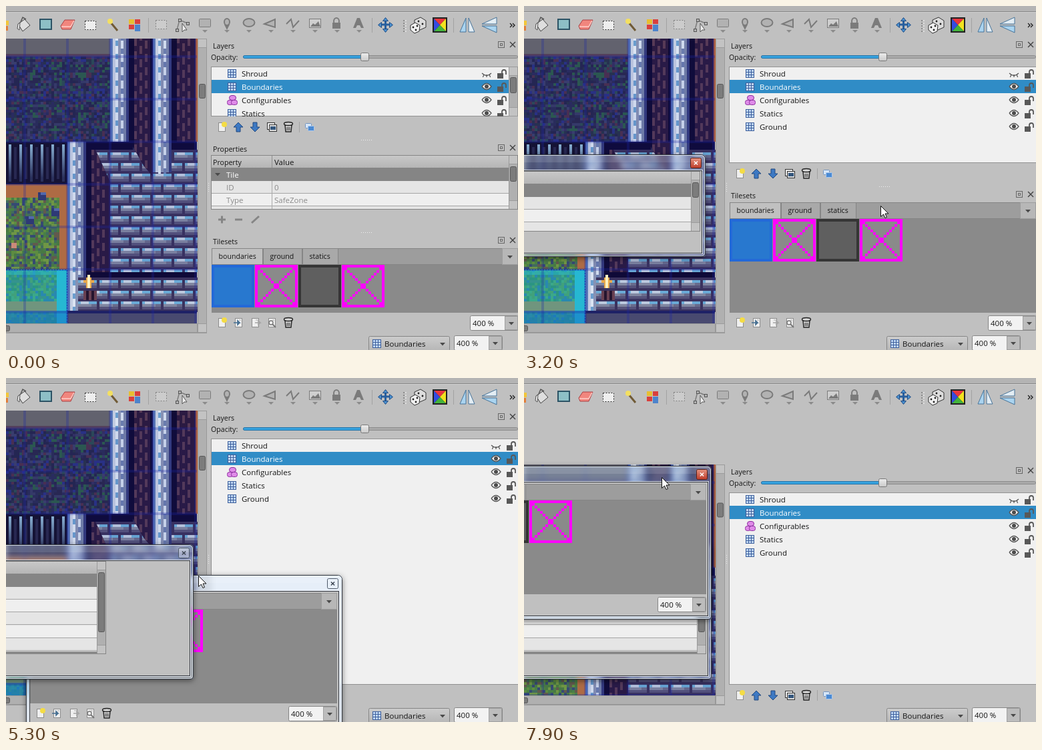
Recreate the animation shown at these times as an HTML page with a canvas. Size 767x517 px, loop 8 s.

```html
<!DOCTYPE html>
<html lang="en">
<head>
<meta charset="utf-8">
<title>Rearranging docks in a map editor</title>
<style>
html, body { margin: 0; width: 100%; height: 100%; overflow: hidden; background: #c0c0c0; }
canvas { display: block; width: 767px; height: 517px; }
</style>
</head>
<body>
<canvas id="stage" width="767" height="517"></canvas>
<script>
const W = 767, H = 517, LOOP = 8000, STEP = 100;
const cv = document.getElementById('stage');
const ctx = cv.getContext('2d');
const layer = () => Object.assign(document.createElement('canvas'), { width: W, height: H });
const back = layer(), map = layer();
const FONT = '"Open Sans", "Noto Sans", sans-serif', SMALL = 10.6;
let g = ctx;

// Drawing helpers
function box(x, y, w, h, fill, line) {
  if (fill) { g.fillStyle = fill; g.fillRect(x, y, w, h); }
  if (line) { g.strokeStyle = line; g.lineWidth = 1; g.strokeRect(x + .5, y + .5, w - 1, h - 1); }
}
function trace(points, closed) {
  g.beginPath();
  for (let i = 0; i < points.length; i += 2) g.lineTo(points[i], points[i + 1]);
  if (closed) g.closePath();
}
function shape(points, fill, line, width = 1, closed = true) {
  trace(points, closed);
  if (fill) { g.fillStyle = fill; g.fill(); }
  if (line) { g.strokeStyle = line; g.lineWidth = width; g.stroke(); }
}
const path = (points, color, width) => shape(points, null, color, width, false);
function oval(x, y, rx, ry, fill, line, width = 1) {
  g.beginPath();
  g.ellipse(x, y, rx, ry, 0, 0, 7);
  if (fill) { g.fillStyle = fill; g.fill(); }
  if (line) { g.strokeStyle = line; g.lineWidth = width; g.stroke(); }
}
function round(x, y, w, h, r, fill, line) {
  g.beginPath();
  g.roundRect(x + .5, y + .5, w - 1, h - 1, r);
  if (fill) { g.fillStyle = fill; g.fill(); }
  if (line) { g.strokeStyle = line; g.lineWidth = 1; g.stroke(); }
}
function text(s, x, y, color = '#151515', size = 11.5) {
  g.font = `${size}px ${FONT}`;
  g.fillStyle = color;
  g.fillText(s, x, y);
}
function shade(y, h, a, b) {
  const grad = g.createLinearGradient(0, y, 0, y + h);
  grad.addColorStop(0, a);
  grad.addColorStop(1, b);
  return grad;
}
function at(x, y, draw) {
  g.save();
  g.translate(x, y);
  draw();
  g.restore();
}
function within(points, draw) {
  g.save();
  trace(points, true);
  g.clip();
  draw();
  g.restore();
}
const clipped = (x, y, w, h, draw) => within([x, y, x + w, y, x + w, y + h, x, y + h], draw);
function track(keys, t) {
  if (t <= keys[0][0]) return keys[0].slice(1);
  for (let i = 1; i < keys.length; i++) {
    const a = keys[i - 1], b = keys[i];
    if (t <= b[0]) {
      const k = (t - a[0]) / (b[0] - a[0]);
      return a.slice(1).map((v, j) => v + (b[j + 1] - v) * k);
    }
  }
  return keys[keys.length - 1].slice(1);
}

// Pixel-art map, drawn once
let seed = 7;
const rand = () => (seed = (seed * 16807) % 2147483647) / 2147483647;
function noise(x0, y0, x1, y1, colors) {
  for (let y = y0; y < y1; y += 4)
    for (let x = x0; x < x1; x += 4) box(x, y, 4, 4, colors[rand() * colors.length | 0]);
}
function pillar(x, y0, y1) {
  box(x, y0, 28, y1 - y0, '#8792b4');
  box(x, y0, 4, y1 - y0, '#5a78b8');
  box(x + 4, y0, 4, y1 - y0, '#c3cde2');
  for (let y = y0; y < y1; y += 4) {
    const n = y / 4 | 0;
    box(x + 8, y, 4, 4, n % 5 < 3 ? '#dbe4f2' : '#6a9dce');
    box(x + 16, y, 4, 4, (n + 2) % 5 < 3 ? '#d0dbee' : '#6a7cae');
  }
  box(x + 20, y0, 4, y1 - y0, '#7480a8');
  box(x + 24, y0, 4, y1 - y0, '#343a7c');
}
function shadowWall(x0, y0, x1, y1) {
  box(x0, y0, x1 - x0, y1 - y0, '#2b1a42');
  for (let x = x0 + 8; x < x1 - 4; x += 8)
    for (let y = y0; y < y1; y += 4)
      if ((y / 4 + x / 8 * 2 | 0) % 5 < 3) box(x, y, 4, 4, '#573a56');
  box(x0, y0, 8, y1 - y0, '#100b36');
}
function bricks(x0, y0, x1, y1) {
  clipped(x0, y0, x1 - x0, y1 - y0, () => {
    box(x0, y0, x1 - x0, y1 - y0, '#3a325e');
    for (let y = y0, n = 0; y < y1; y += 16, n++)
      for (let x = x0 - 32 + n % 2 * 16; x < x1; x += 32) {
        box(x, y + 4, 28, 4, '#6aaad6');
        box(x + 4, y + 4, 12, 4, '#bcc9de');
        box(x, y + 8, 28, 4, '#8086a0');
        box(x + 20, y + 8, 8, 4, '#686b8c');
        box(x, y + 12, 28, 4, '#56537a');
      }
  });
}
function paintMap() {
  g = map.getContext('2d');
  box(0, 48, 286, 430, '#292b58');
  box(0, 48, 156, 24, '#62626e');
  box(0, 72, 156, 4, '#54405c');
  const dark = ['#25264f', '#2b2c5c', '#343062', '#4b304f', '#28324c', '#2b3284', '#2d4a55', '#3b3f6b', '#25264f'];
  noise(0, 76, 156, 204, dark);
  for (const y of [84, 148])
    for (let x = 32; x < 156; x += 36) noise(x, y, x + 16, y + 40, ['#2b2d58', '#2d5a4c', '#373a66', '#29274f']);
  pillar(156, 48, 204);
  shadowWall(184, 48, 220, 204);
  box(216, 48, 4, 156, '#100b36');
  shadowWall(248, 48, 284, 204);
  box(284, 48, 4, 156, '#c4692f');
  bricks(124, 216, 288, 400);
  within([120, 216, 134, 216, 156, 264, 156, 404, 120, 404], () => shadowWall(120, 204, 156, 404));
  within([186, 204, 220, 204, 220, 256, 206, 240], () => shadowWall(184, 204, 220, 256));
  box(120, 204, 70, 12, '#0f0a38');
  pillar(220, 48, 250);
  box(248, 204, 38, 12, '#0f0a38');

  box(0, 204, 92, 64, '#15122f');
  for (let x = 4; x < 92; x += 16) {
    box(x, 208, 4, 56, shade(208, 50, '#8fb8d6', '#2c3158'));
    box(x + 8, 212, 4, 48, '#29284e');
  }
  box(0, 268, 92, 130, '#b8703f');
  noise(0, 288, 80, 396, ['#4b7d3f', '#62933c', '#759d40', '#45705a', '#384c70', '#4c8542', '#665d48']);
  for (const [x, y] of [[48, 280], [68, 304], [30, 316]]) {
    box(x, y, 12, 12, '#303a74');
    box(x + 4, y, 8, 4, '#566cad');
  }
  box(8, 356, 8, 8, '#d59078');
  pillar(92, 204, 460);
  box(120, 400, 166, 8, '#0f0a38');
  bricks(108, 408, 288, 460);
  box(92, 458, 194, 20, '#494a70');
  box(92, 458, 194, 4, '#20204e');

  noise(0, 396, 76, 478, ['#3e895b', '#5c9b50', '#4a866b', '#3a789a', '#55a565']);
  box(0, 444, 76, 16, '#a08a55');
  box(0, 396, 92, 82, 'rgba(0,175,220,.3)');
  box(0, 396, 92, 8, 'rgba(38,184,210,.5)');
  box(76, 396, 16, 82, '#26b8d2');
  box(0, 458, 92, 20, 'rgba(20,110,200,.5)');
  g.setLineDash([2, 2]);
  path([0, 396.5, 91.5, 396.5, 91.5, 477], '#173bb8', 1);
  g.setLineDash([]);

  box(116, 428, 20, 14, '#25152f');
  for (let x = 116; x < 138; x += 8) box(x, 428, 4, 14, '#694152');
  box(120, 408, 8, 16, '#e9a94c');
  box(116, 412, 16, 4, '#e9a94c');
  box(122, 404, 4, 20, '#fff2c0');

  // Boundary tint and tile grid
  box(0, 76, 286, 320, 'rgba(30,40,150,.06)');
  for (let x = 28; x < 286; x += 64) box(x - 2, 48, 4, 430, 'rgba(28,38,165,.28)');
  for (let y = 76; y < 478; y += 64) box(0, y - 2, 286, 4, 'rgba(28,38,165,.28)');
  g = ctx;
}

// Widgets
function scrollbar(x, y, h, from, size) {
  box(x, y, 14, h, '#b0b0b0', '#989898');
  box(x, y, 14, 14, '#c3c3c3', '#9b9b9b');
  box(x, y + h - 14, 14, 14, '#c3c3c3', '#9b9b9b');
  round(x + 2, from, 10, size, 2, '#7c7c7c', '#575757');
}
function arrow(x, y) { shape([x - 4, y - 2, x + 4, y - 2, x, y + 2.5], '#4a4a4a'); }
function dots(x, y) { for (let i = 0; i < 6; i++) box(x + i * 3, y, 1, 1, '#eee'); }
function combo(x, y, label, w, white) {
  round(x, y, w, 23, 2, white ? '#f2f2f2' : shade(y, 23, '#cdcdcd', '#b5b5b5'), '#858585');
  if (white) box(x + 52, y + 1, w - 53, 21, '#bcbcbc', '#a0a0a0');
  arrow(x + w - 11, y + 12);
  text(label, x + (white ? 4 : 24), y + 16);
}
function cross(x, y, r, color) {
  path([x - r, y - r, x + r, y + r], color, 1.4);
  path([x + r, y - r, x - r, y + r], color, 1.4);
}
function dockTitle(name, y) {
  text(name, 310, y + 6, '#151515', SMALL);
  box(737, y - 5, 10, 10, null, '#666');
  box(740, y - 2, 4, 4, null, '#666');
  cross(759, y, 4, '#444');
}
function gridIcon(x, y) {
  box(x, y, 13, 13, '#3d5f9c');
  for (let i = 0; i < 9; i++) box(x + 1 + i % 3 * 4, y + 1 + (i / 3 | 0) * 4, 3, 3, '#c2d9f5');
}
function page(x, y) {
  box(x - 5, y - 7, 11, 14, '#efefef', '#8d8d8d');
  path([x + 1, y - 4, x + 4, y - 4], '#aaa', 1);
}
function newIcon(x, y) {
  page(x, y);
  oval(x + 4, y - 4, 4, 4, '#f4dc45');
}
function trash(x, y) {
  shape([x - 5, y - 3, x + 5, y - 3, x + 4, y + 7, x - 4, y + 7], '#cacaca', '#222', 1.4);
  oval(x, y - 5, 6.5, 2.5, '#d5d5d5', '#222', 1.4);
  for (let i = -2; i < 3; i += 2) path([x + i, y, x + i, y + 5], '#444', 1);
}
function bigArrow(x, y, s) {
  shape([x, y - 7 * s, x + 7, y, x + 3, y, x + 3, y + 7 * s, x - 3, y + 7 * s, x - 3, y, x - 7, y], '#3d79c3', '#22497f');
}
function tileButtons(x, y) {
  newIcon(x + 15, y);
  for (let i = 1; i < 4; i++) page(x + 15 + i * 25, y);
  path([x + 33, y, x + 42, y, x + 39, y - 3, x + 39, y + 3, x + 42, y], '#456f91', 1.6);
  path([x + 65, y, x + 73, y, x + 70, y - 3, x + 70, y + 3, x + 73, y], '#a5a5a5', 1.6);
  oval(x + 89, y, 3, 3, null, '#777', 1.4);
  path([x + 91, y + 2, x + 96, y + 7], '#777', 2);
  trash(x + 115, y);
}
function eye(x, y, open) {
  g.beginPath();
  g.moveTo(x - 7, y);
  if (open) g.quadraticCurveTo(x, y - 9, x + 7, y);
  g.quadraticCurveTo(x, y + (open ? 9 : 7), open ? x - 7 : x + 7, y);
  g.lineWidth = 1.3;
  g.strokeStyle = '#555';
  if (open) { g.fillStyle = '#f4f4f4'; g.fill(); }
  g.stroke();
  if (open) oval(x, y, 3, 3, '#4c4c4c');
  else for (let i = -4; i < 5; i += 4) path([x + i, y + 2, x + i * 1.4, y + 6], '#555', 1.2);
}
function lock(x, y) {
  box(x - 7, y - 1, 9, 8, '#585858');
  g.beginPath();
  g.arc(x + 3, y - 3, 3, Math.PI, 0);
  g.strokeStyle = '#585858';
  g.lineWidth = 1.8;
  g.stroke();
  path([x, y - 3, x, y], '#585858', 1.8);
  path([x + 6, y - 3, x + 6, y + 1], '#585858', 1.8);
}

function toolbar() {
  box(0, 0, W, 8, '#b4b4b4');
  box(0, 8, W, 1, '#858585');
  box(0, 9, W, 1, '#d3d3d3');
  const gray = '#7b7b7b', mid = '#b2b2b2';
  box(-4, 22, 8, 7, '#f2c63b');
  box(-4, 30, 7, 7, '#e2803c');
  shape([18, 27, 28, 20, 36, 29, 25, 38], '#dedede', '#444');
  shape([18, 27, 21, 25, 20, 36, 17, 34], '#e6e6e6', '#555');
  path([22, 24, 25, 17, 30, 20], '#555', 1.5);
  box(50, 19, 19, 17, '#2c5365');
  box(52, 21, 15, 13, '#8dbfc6');
  shape([82, 30, 88, 21, 103, 21, 97, 35, 84, 35], '#f1867e', '#a93f42');
  path([83, 31, 97, 31, 102, 22], '#ffd0ca', 1.4);
  g.setLineDash([2, 2]);
  box(118, 22, 17, 14, '#eee', '#222');
  box(224, 21, 17, 14, '#ccc', gray);
  g.setLineDash([]);
  path([157, 25, 167, 37], '#705a36', 3);
  oval(156, 23, 4, 4, '#f3df61');
  box(184, 20, 8, 7, '#e8bf31');
  box(193, 20, 8, 7, '#d9403d');
  box(184, 28, 8, 7, '#d9403d');
  box(193, 28, 8, 10, '#4d83cb');
  for (const x of [213, 548, 670]) box(x, 18, 1, 22, '#a2a2a2');
  path([256, 36, 260, 21, 272, 26], gray, 1.5);
  shape([264, 26, 264, 39, 267, 36, 271, 36], '#eee', '#555');
  for (const [x, y] of [[254, 34], [258, 19], [270, 24]]) box(x, y, 5, 5, mid, '#555');
  round(289, 19, 18, 13, 1, mid, gray);
  oval(331, 24, 4, 5, mid, gray, 2);
  shape([327, 28, 335, 28, 331, 36], gray);
  oval(364, 25, 8.5, 6, mid, gray, 2);
  shape([387, 27, 403, 20, 403, 32], mid, gray, 2);
  path([420, 27, 427, 20, 430, 32, 439, 22], gray, 2);
  box(454, 19, 18, 14, '#cfcfcf', gray);
  shape([456, 31, 460, 26, 463, 28, 468, 23, 471, 31], gray);
  box(489, 25, 12, 9, gray);
  oval(495, 23, 4, 5, null, gray, 2);
  shape([520, 33, 526, 18, 530, 18, 536, 33, 532, 33, 530, 29, 526, 29, 524, 33], gray);
  for (let x = 298; x < 535; x += 33) shape([x - 4, 36, x + 4, 36, x, 40], '#8a8a8a');
  path([559, 28, 578, 28], '#285f9e', 3);
  path([568.5, 19, 568.5, 38], '#285f9e', 3);
  for (let i = 0; i < 4; i++) at(568.5, 28.5, () => {
    g.rotate(i * Math.PI / 2);
    shape([0, -11, 4, -6, -4, -6], '#4c92d1', '#1f4b83');
  });
  for (let y = 21; y < 38; y += 4) { box(595, y, 2, 2, '#8d8d8d'); box(598, y, 2, 2, '#ddd'); }
  shape([612, 21, 621, 17, 629, 22, 629, 32, 620, 36, 612, 30], '#ddd', '#333');
  shape([606, 29, 613, 25, 620, 29, 619, 38, 612, 41, 606, 36], '#f1f1f1', '#333');
  for (const [x, y] of [[618, 23], [624, 27], [610, 32], [614, 36], [616, 30]]) oval(x, y, 1.4, 1.4, '#222');
  box(639, 17, 22, 23, '#222');
  const fan = [[641, 19, 659, 19, '#e8363d'], [659, 19, 659, 38, '#f2e21f'], [659, 38, 641, 38, '#43b33c'], [641, 38, 641, 19, '#334be0']];
  for (const [a, b, c, d, color] of fan) shape([a, b, c, d, 650, 28.5], color);
  shape([680, 39, 689, 18, 689, 39], '#aad4f0', '#477398');
  shape([702, 39, 693, 18, 693, 39], '#e3edf4', '#477398');
  shape([713, 27, 735, 17, 735, 27], '#e3edf4', '#477398');
  shape([713, 30, 735, 40, 735, 30], '#aad4f0', '#477398');
  for (const x of [755, 759]) path([x, 26, x + 3, 29, x, 32], '#222', 1.4);
}

function mapView(gap) {
  clipped(0, 49 + gap, 287, 428 - gap, () => g.drawImage(map, 0, gap));
  scrollbar(287, 49 + gap, 442 - gap, 117 + gap * .87, 22);
  box(0, 477, 287, 14, '#b0b0b0', '#989898');
  round(-8, 480, 14, 9, 2, '#7c7c7c', '#575757');
  for (let y = 266; y < 280; y += 3) box(303, y, 1, 1, '#eee');
  box(0, 491, 301, 1, '#999');
}

function layersDock(gap, bottom, narrow) {
  const names = ['Shroud', 'Boundaries', 'Configurables', 'Statics', 'Ground'];
  at(0, gap, () => {
    dockTitle('Layers', 58);
    text('Opacity:', 307, 81, '#151515', SMALL);
    round(355, 74, 412, 5, 2, '#aaa', '#8b8b8b');
    round(355, 74, 180, 5, 2, '#38a3df', '#2172a8');
    round(531, 70, 13, 13, 2, shade(70, 13, '#eee', '#c8c8c8'), '#777');
  });
  const top = 91 + gap;
  clipped(307, top, 460, bottom - top, () => {
    box(307, top, 461, bottom - top, '#f0f0f0', '#919191');
    names.forEach((name, i) => {
      const y = 101 + gap + i * 20, on = i === 1;
      if (on) box(308, y - 10, 460, 20, '#308cc6');
      if (i === 2) {
        round(334, y - 7, 11, 8, 4, '#df8be8', '#8b2c9d');
        round(331, y, 9, 8, 3, '#df8be8', '#8b2c9d');
        round(337, y, 10, 8, 3, '#df8be8', '#8b2c9d');
      } else gridIcon(332, y - 6);
      text(name, 353, y + 5, on ? '#fff' : '#151515');
      eye(narrow ? 720 : 734, y, i > 0);
      lock(narrow ? 743 : 757, y + 1);
    });
    if (narrow) scrollbar(753, top, bottom - top, 107, 24);
  });
  const y = bottom + 16;
  newIcon(323, y);
  bigArrow(348, y, 1);
  bigArrow(373, y, -1);
  box(391, y - 7, 12, 11, '#eee', '#333');
  box(394, y - 4, 12, 11, '#ddd', '#333');
  box(396, y - 1, 8, 5, '#33567d');
  trash(423, y);
  box(439, y - 8, 1, 16, '#a3a3a3');
  round(448, y - 6, 10, 8, 1, '#d7e6f7', '#7293bd');
  round(452, y - 2, 10, 8, 1, '#4b8ad3', '#aecbef');
}

function propTable(x, y, right, h) {
  const w = right - x, row = 19.3;
  clipped(x, y, w, h, () => {
    box(x, y, w, h, '#8a8a8a');
    for (let i = 0; i < 5; i++) {
      const ry = Math.round(y + (i + 2) * row);
      box(x, ry, w, 20, i % 2 ? '#efefef' : '#e5e5e5');
      box(x, ry + 18, w, 1, '#a5a5a5');
    }
    box(x, y, w, 19, shade(y, 19, '#c9c9c9', '#b5b5b5'));
    box(x, y + 19, w, 20, '#858585');
    box(x + 91, y, 1, 19, '#8f8f8f');
    box(x + 91, y + 39, 1, 96, '#aaa');
    text('Property', x + 3, y + 15, '#151515', SMALL);
    text('Value', x + 95, y + 15);
    arrow(x + 10, y + 29);
    text('Tile', x + 23, y + 34, '#fff');
    text('ID', x + 23, y + 53, '#8b8b8b');
    text('0', x + 95, y + 53, '#8b8b8b');
    text('Type', x + 23, y + 72, '#8b8b8b');
    text('SafeZone', x + 95, y + 72, '#8b8b8b');
    scrollbar(right - 14, y, h, y + 17, h > 125 ? 90 : 23);
    box(x, y, w, h, null, '#858585');
  });
}
function propButtons(x, y) {
  path([x + 10, y, x + 21, y], '#858585', 3);
  path([x + 15.5, y - 5.5, x + 15.5, y + 5.5], '#858585', 3);
  path([x + 35, y, x + 46, y], '#858585', 3);
  path([x + 60, y + 5, x + 71, y - 5], '#858585', 3);
}

function tileset(x, y, right, h) {
  const w = right - x;
  box(x, y, w, 25, '#9d9d9d', '#858585');
  [['boundaries', 0, 77], ['ground', 77, 59], ['statics', 136, 54]].forEach(([name, left, tw], i) => {
    box(x + left, y, tw, 25, i ? '#a9a9a9' : '#c0c0c0', '#858585');
    text(name, x + left + 10.5, y + 16, '#151515', SMALL);
  });
  box(right - 24, y, 24, 25, '#b7b7b7', '#9d9d9d');
  arrow(right - 12, y + 13);
  const ty = y + 25;
  box(x, ty, w, h, '#8a8a8a');
  for (let i = 0; i < 4; i++) {
    const tx = x + i * 65;
    if (i % 2) {
      box(tx, ty, 64, 64, '#ff00ff');
      box(tx + 4, ty + 4, 56, 56, '#8a8a8a');
      for (let p = 1; p < 15; p++) {
        box(tx + p * 4, ty + p * 4, 4, 4, '#ff00ff');
        box(tx + 60 - p * 4, ty + p * 4, 4, 4, '#ff00ff');
      }
    } else {
      box(tx, ty, 64, 64, i ? '#353535' : '#2369d8');
      box(tx + 4, ty + 4, 56, 56, i ? '#5f5f5f' : '#2878cf');
    }
  }
  tileButtons(x, ty + h + 15);
}

// Floating glass window
function glass(l, t, w, h, tint, active, draw) {
  const r = l + w;
  back.getContext('2d').drawImage(cv, 0, 0);
  g.save();
  g.shadowColor = 'rgba(0,0,0,.55)';
  g.shadowBlur = 9;
  g.shadowOffsetY = 2;
  round(l, t, w, h, [6, 6, 3, 3], '#c0c0c0');
  g.restore();
  g.save();
  g.beginPath();
  g.roundRect(l, t, w, h, [6, 6, 3, 3]);
  g.clip();
  g.filter = 'blur(4px)';
  g.drawImage(back, 0, 0);
  g.filter = 'none';
  box(l, t, w, h, tint);
  box(l, t, w, 12, 'rgba(255,255,255,.12)');
  g.restore();
  round(l, t, w, h, [6, 6, 3, 3], null, '#30343c');
  round(l + 1, t + 1, w - 2, h - 2, 5, null, 'rgba(240,248,255,.75)');
  box(l + 4, t + 23, w - 8, h - 27, null, 'rgba(245,250,255,.85)');
  box(l + 5, t + 24, w - 10, h - 29, '#c0c0c0', '#30343c');
  const bx = r - 23, by = t + 5;
  round(bx, by, 17, 16, 2, active ? shade(by, 16, '#e79784', '#bd3826') : 'rgba(235,242,250,.45)', active ? '#592017' : '#4d5968');
  cross(r - 14.5, t + 13, 2.6, active ? '#fff' : '#39424e');
  clipped(l + 6, t + 25, w - 12, h - 31, draw);
}

const cursorKeys = [
  [100, 748, 45], [1000, 581, 209], [1300, 581, 209], [2100, 128, 255], [2500, 76, 234], [3000, 496, 286],
  [3200, 534, 300], [3400, 557, 285], [3900, 395, 298], [4100, 310, 356], [4200, 150, 232], [4400, 160, 262],
  [4500, 202, 376], [4700, 202, 400], [4900, 202, 450], [5100, 330, 356], [5300, 288, 297],
  [5700, 152, 118], [6100, 149, 158], [6700, 150, 156], [7400, 206, 146], [7900, 206, 149]
];
const propKeys = [
  [1300, 779, 206, 154], [2100, 329, 225, 154], [2500, 272, 223, 154], [4200, 272, 223, 154],
  [4400, 281, 250, 153], [4700, 281, 250, 153], [4900, 281, 250, 203]
];
const tileKeys = [
  [3400, 775, 270], [3900, 610, 278], [4100, 433, 344], [5100, 433, 344], [5300, 504, 296],
  [5700, 368, 109], [6100, 365, 112], [6700, 365, 112], [7400, 281, 132]
];
const gapKeys = [[5700, 0], [6100, 144], [6700, 144], [6900, 0], [7100, 0], [7400, 144], [7700, 144], [7900, 81], [8000, 40]];
const insetKeys = [[4200, 8], [4500, 123], [5300, 131], [5700, 8]];

function propWindow(t) {
  const [r, y, h] = track(propKeys, t).map(Math.round);
  const [inset] = track(insetKeys, t);
  glass(r - 474, y, 474, h, 'rgba(185,205,230,.28)', t >= 2400 && t < 3400, () => {
    propTable(r - 468, y + 25, Math.round(r - inset), h - 63);
    propButtons(r - 468, y + h - 22);
  });
}
function tileWindow(t) {
  const [r, y] = track(tileKeys, t).map(Math.round);
  const active = t >= 7400;
  glass(r - 474, y, 474, 231, active ? 'rgba(150,178,210,.4)' : 'rgba(226,238,253,.65)', active, () => {
    tileset(r - 468, y + 27, r - 8, 141);
    combo(r - 81, y + 197, '400 %', 73, true);
  });
}

function render(t) {
  const gap = Math.round(track(gapKeys, t)[0]);
  const [a] = track([[1200, 0], [1400, 1]], t), [b] = track([[3300, 0], [3600, 1]], t);
  const bottom = Math.round(166 + a * 70 + b * 225);
  box(0, 0, W, H, '#c0c0c0');
  toolbar();
  mapView(gap);
  layersDock(gap, bottom, t < 1300);
  if (t < 1300) {
    dots(532, 201);
    dockTitle('Properties', 213);
    propTable(307, 224, 767, 82);
    propButtons(308, 321);
  }
  if (t < 3400) {
    const y = Math.round(352 - a * 69);
    dots(532, y - 12);
    dockTitle('Tilesets', y);
    tileset(308, y + 12, 767, 461 - y - 37);
    combo(695, 465, '400 %', 73, true);
  }
  combo(543, 496, 'Boundaries', 122, false);
  gridIcon(549, 501);
  combo(671, 495, '400 %', 73, true);

  const props = () => t >= 1300 && propWindow(t), tiles = () => t >= 3400 && tileWindow(t);
  (t < 7400 ? [tiles, props] : [props, tiles]).forEach(draw => draw());
  if (t >= 100) {
    const [x, y] = track(cursorKeys, t).map(Math.round);
    at(x + .5, y + .5, () => shape([0, 0, 0, 16, 4, 12.5, 6.5, 18, 9, 17, 6.5, 11.5, 11.5, 11.5], '#fff', '#111'));
  }
}

paintMap();
const start = performance.now();
let shown = -1;
function tick() {
  const t = Math.floor((performance.now() - start) % LOOP / STEP) * STEP;
  if (t !== shown) render(shown = t);
  requestAnimationFrame(tick);
}
tick();
</script>
</body>
</html>
```
